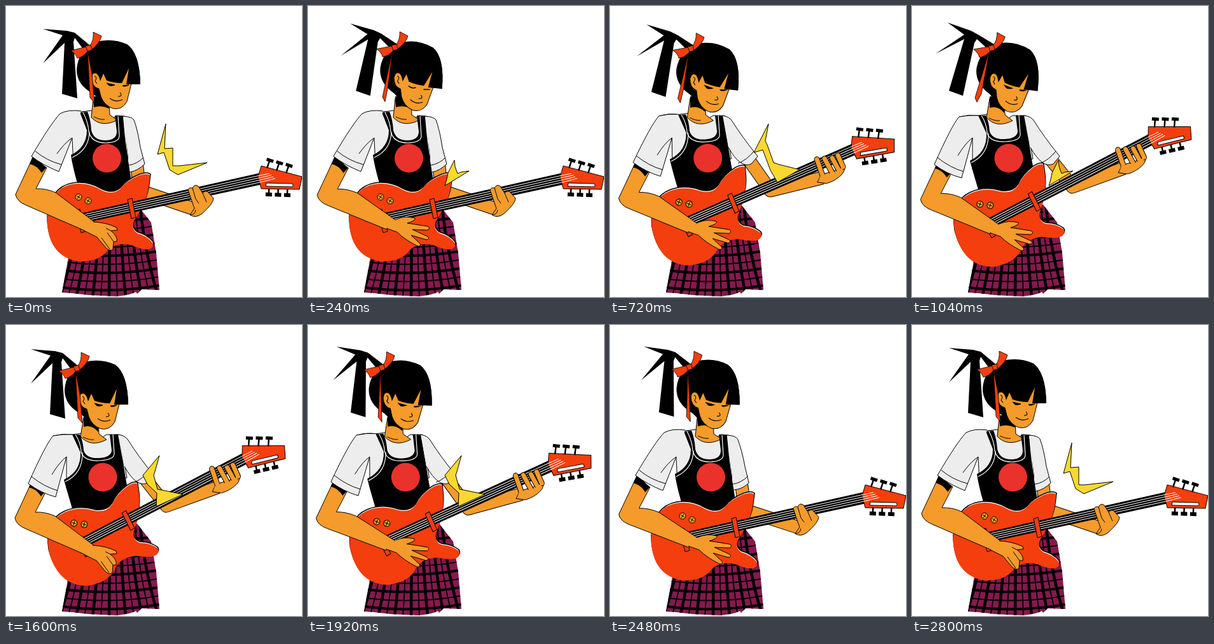
Write an HTML page with a canvas that moves like this. It is 465x457 px and loops after 2.88 s.

```html
<!DOCTYPE html>
<html>
<head>
<meta charset="utf-8">
<style>
  html, body { margin: 0; width: 100%; height: 100%; overflow: hidden; background: #fff; }
  canvas { display: block; }
</style>
</head>
<body>
<canvas id="stage" width="465" height="457"></canvas>
<script>
const ctx = document.getElementById('stage').getContext('2d');
const SKIN = '#f49b2b', RED = '#f43e0d', SHIRT = '#ededed', YELLOW = '#f9d92f', PLUM = '#85194f';
const STEP = 80, LOOP = 2800, CYCLE = 2880;
const NUM = /-?\d+(\.\d+)?/g;

const lerp = (a, b, k) => a + (b - a) * k;

// Blend two paths that share the same commands
function mix(a, b, k) {
  const target = b.match(NUM);
  let i = 0;
  return a.replace(NUM, n => lerp(+n, +target[i++], k));
}

function shape(d, fill, stroke, width = 1) {
  const path = new Path2D(d);
  if (fill) { ctx.fillStyle = fill; ctx.fill(path); }
  if (stroke) { ctx.strokeStyle = stroke; ctx.lineWidth = width; ctx.stroke(path); }
}

const line = (d, color = '#000', width = 1) => shape(d, null, color, width);

// Skin-coloured stroke with a thin outline
function limb(d, width) {
  line(d, '#000', width + 2);
  line(d, SKIN, width);
}

function disc(x, y, r, fill, stroke) {
  ctx.beginPath();
  ctx.arc(x, y, r, 0, 7);
  ctx.fillStyle = fill;
  ctx.fill();
  if (stroke) { ctx.strokeStyle = stroke; ctx.lineWidth = 1; ctx.stroke(); }
}

function placed(x, y, degrees, draw) {
  ctx.save();
  ctx.translate(x, y);
  ctx.rotate(degrees * Math.PI / 180);
  draw();
  ctx.restore();
}

// Eased value through [time, value] keys
function track(t, keys) {
  let i = 1;
  while (i < keys.length - 1 && keys[i][0] < t) i++;
  const [t0, a] = keys[i - 1], [t1, b] = keys[i];
  const p = Math.min(1, Math.max(0, (t - t0) / (t1 - t0)));
  return lerp(a, b, p * p * (3 - 2 * p));
}

const LIFT = [[0, 0], [480, 0], [840, 1], [1760, 1], [2320, 0], [LOOP, 0]];
const SLIDE = [[0, 0], [440, 0], [780, 1], [1840, 1], [2560, 0], [LOOP, 0]];
const STRUM = [[0, 0], [80, 1], [240, .1], [400, 1], [560, 0], [720, .1], [880, 1], [1040, .1], [1320, 1],
  [1520, .1], [1600, 0], [1700, 1], [1840, .1], [2160, 1], [2320, 1], [2520, .1], [2640, 0], [LOOP, 0]];
const BOW_X = [[0, 130], [240, 136], [720, 127], [1040, 125], [1600, 111], [2160, 119], [LOOP, 130]];
const BOW_Y = [[0, 66], [240, 65], [720, 67], [1040, 66], [1600, 68], [2160, 66], [LOOP, 66]];
const NOD = [[0, 0], [240, .75], [520, .2], [720, .8], [1040, 1], [1280, .3], [1600, 0], [2160, .45], [LOOP, 0]];

const BOLTS = [
  'M230 242L220 262L218 272L215 282L222 278L253 259L240 261L235 263L233 258L231 252Z',
  'M241 205L215 236L222 250L237 264L236 285L278 266L244 259L238 258L232 236L234 230Z',
  'M249 185L226 230L240 226L252 258L263 277L298 257L266 249L257 246L247 218L244 212Z',
  'M251 185L238 233L248 230L257 257L270 265L316 246L272 251L262 251L262 223L249 224Z'
];
const STRIKES = [160, 480, 960, 1440, 1760, 2480];

function drawSkirt() {
  const d = 'M108 340L98 395L88 450L104 451L130 454L150 455L173 456Q196 454 204 449L206 452L213 445L241 446L236 388L228 340L206 312Z';
  shape(d, PLUM);
  ctx.save();
  ctx.clip(new Path2D(d));
  for (let i = 0; i < 13; i++) {
    const x = 84 + i * 13;
    line(`M${lerp(165, x, .6)} 310Q${lerp(165, x, .72)} 395 ${x} 458`, '#000', i % 2 ? 1.8 : 4.5);
  }
  for (let i = 0; i < 9; i++) {
    const y = 336 + i * 13.5;
    line(`M80 ${y - 3}Q165 ${y + 9} 245 ${y - 6}`, '#000', i % 2 ? 2 : 4);
  }
  ctx.restore();
}

function drawTorso(g) {
  shape(mix('M85 170Q100 162 118 166L136 164Q150 190 174 172L186 173L192 240L106 250L104 208Z',
    'M74 174Q90 170 104 172L119 170Q134 190 158 172L178 172L190 240L95 256L95 207Z', g), SHIRT, '#000');
  shape(mix('M137 145L134 175Q150 192 175 179L163 171L162 145Z',
    'M122 145L117 175Q133 193 158 180L146 171L145 145Z', g), SKIN, '#000');
  shape(mix('M137 142L138 159Q150 155 162 161L160 142Z',
    'M122 142L122 160Q135 156 145 168L145 142Z', g), '#000');
  line(mix('M138 174Q148 179 155 178', 'M121 176Q131 181 138 180', g));
  shape(mix('M116 167L128 166Q133 178 134 195Q138 212 158 211Q174 210 174 197L171 172L184 173Q186 200 188 215Q192 245 197 275L206 325L115 325L112 278Q104 250 102 234Q127 222 127 195Z',
    'M104 172L116 172Q121 182 122 197Q126 210 146 209Q165 208 166 197L163 172L176 172Q181 200 184 215Q188 245 196 280L206 325L115 325L104 288Q95 258 91 243Q118 230 117 200Z', g), '#000');
  line(mix('M121 167Q129 182 130 197Q134 215 157 215Q178 214 178 204L176 173', 'M109 172Q117 184 118 199Q122 214 146 213Q170 212 170 202L168 172', g), '#fff', 1.2);
  line(mix('M131 198Q130 226 104 238', 'M120 200Q121 233 93 246', g), '#fff', 1.2);
  disc(lerp(158.5, 152, g), 239, 22.5, '#ea322c');
}

function drawFretArm(g, k, hand) {
  const reach = Math.min(1, k * 1.5);
  const elbow = [lerp(210, 252, reach), lerp(290, 284, reach) + (1 - g) * reach * 22];
  ctx.lineJoin = 'round';
  limb(`M${lerp(204, 214, reach)} 236L${elbow}L${hand.x - 10} ${hand.y + 13}`, 19);
  ctx.lineJoin = 'miter';
  shape(mix('M184 173Q198 174 201 179Q207 195 211 222L218 248Q208 258 195 261L187 215Z',
    'M177 172Q188 174 192 181L207 205L232 236Q222 248 205 256L186 222Z', reach), SHIRT, '#000');
  line(mix('M216 238Q206 248 193 250', 'M226 228Q215 242 201 247', reach));
}

function drawGuitar() {
  const body = 'M227 264Q222 260 210 264Q190 272 180 285Q168 296 150 287Q128 274 104 278Q70 284 65 330Q65 390 113 399Q146 401 160 382Q172 369 196 373Q216 382 226 380Q234 376 231 370Q222 359 207 355Q196 348 202 335Q222 305 225 280Z';
  shape(body, '#fff', '#000', 1.6);
  placed(-.5, 2, 0, () => shape(body, RED));
  disc(114, 300, 5, '#e8a72c', '#000');
  disc(129, 306, 5, '#e8a72c', '#000');
  line('M111 298L117 302M116 297L112 303M126 304L132 308M131 303L127 309');
  shape('M120 325L400 262L403 280L122 341Z', '#000');
  shape('M109 321L116 319L125 354L118 356Z', RED, '#000');
  shape('M401 251L465 268L461 288L401 287L396 268Z', RED, '#000');
  for (let i = 0; i < 4; i++)
    line(`M121 ${328 + i * 3.3}L${399 + i} ${266 + i * 3.4}L${414 + i * 3} ${263 + i * 2.6}`, '#fff');
  shape('M191 304L198 302L204 332L197 334Z', RED, '#000');
  shape('M409 278L450 279Q452 282 450 284L408 283Z', '#fff', '#000');
  for (let i = 0; i < 3; i++) {
    placed(413 + i * 15, 246 + i * 4, 19, () => { line('M-5 -4H6', '#000', 5); line('M0 -4V9', '#000', 2.5); });
    placed(413 + i * 14.5, 291 + i * .5, 2, () => { line('M-5 5H5', '#000', 6); line('M0 -4V6', '#000', 2.5); });
  }
}

function drawFretHand(k, hand) {
  placed(hand.x, hand.y, 0, () => {
    if (k < .4) {
      shape('M-20 -17Q-18 -22 -13 -20Q-10 -27 -4 -23L3 -12Q8 -18 12 -13L20 -4Q20 4 2 20Q-8 28 -17 22L-10 12Z', SKIN, '#000');
      line('M-13 -20L-8 -3L-3 4M3 -12L9 2M-17 22Q-9 22 -8 14');
      return;
    }
    ctx.lineCap = ctx.lineJoin = 'round';
    shape('M-12 8L8 2L23 -6Q27 0 20 8Q10 18 -4 22L-18 20Z', SKIN, '#000');
    for (const finger of ['M-19 -16L-10 10', 'M-7 -17L6 7', 'M5 -18L16 2', 'M14 -22L22 -4']) limb(finger, 7);
    shape('M-13 9L8 5L22 -4L20 6Q10 16 -4 20L-17 19Z', SKIN);
  });
}

function drawStrumArm(g, u) {
  ctx.save();
  ctx.translate(-g, 7 * g);
  shape(mix('M42 238L15 296Q17 307 32 313L124 353L140 340L78 293Q62 286 47 287L64 254Z',
    'M38 244L9 303Q12 314 28 317L122 334L131 313L72 299Q56 293 40 291L58 258Z', u), SKIN, '#000');
  shape(mix('M43 234L37 248Q48 250 56 262L63 254Z', 'M41 238L35 249Q45 251 53 264L60 258Z', u), '#000');
  if (u > .6) {
    placed(0, (1 - u) * 20, 0, () => {
      const d = 'M130 312Q138 302 157 292Q163 294 150 304L180 303Q184 306 180 309L158 312L176 313Q178 318 160 320L165 323Q162 330 146 331L121 333';
      shape(d, SKIN);
      line(d + 'M158 312L146 314M160 320L148 320M150 304L140 309');
    });
  } else if (u > .04) {
    placed(2, -3 - u * 20, 0, () => {
      const d = 'M137 340Q150 334 166 338Q168 342 154 346L186 351Q191 354 186 357L162 356L186 367Q190 371 184 372L160 365L174 378Q176 383 170 382Q150 372 138 360L121 354';
      shape(d, SKIN);
      line(d);
    });
  } else {
    const d = 'M137 339Q158 340 174 348L175 352L165 353Q176 362 174 370L169 370L168 382Q164 386 157 380L143 363L123 353';
    shape(d, SKIN);
    line(d + 'M165 353L157 349M169 370L159 356M163 382L150 364');
  }
  ctx.restore();
  shape(mix('M118 165Q98 162 85 169Q70 185 40 236Q58 250 83 260L104 207',
    'M104 172Q90 171 74 174Q62 188 35 249Q55 264 78 270L95 207', g), SHIRT);
  line(mix('M118 165Q98 162 85 169Q70 185 40 236Q58 250 83 260L104 207Q92 215 80 232M46 228Q64 243 87 249',
    'M104 172Q90 171 74 174Q62 188 35 249Q55 264 78 270L95 207Q84 215 72 235M40 238Q60 254 81 260', g));
}

function drawTail(s) {
  shape(mix('M2 -4L-22 -24L-34 -27L-72 -30L-41 -20L-72 24L-38 -8L-42 72L-18 79L-24 -10L-22 -16L-4 8Z',
    'M7 -4L-21 -21L-32 -27L-69 -40L-43 -21L-88 9L-43 -14L-67 67L-45 75L-27 -8L-23 -14L1 8Z', s), '#000');
}

// Head coordinates are relative to the bow
function drawHead(s, blink) {
  placed(0, 0, 8 * s, () => placed(-130, -66, 0, () => {
    shape('M137 138Q111 124 111 100Q113 70 140 57Q165 49 190 60Q210 74 211 122L190 123L150 150Z', '#000');
    shape('M146 100L146 108Q136 100 134 113Q135 127 146 130L149 142Q154 156 168 161Q182 164 190 150L197 122L195 96Z', SKIN, '#000');
    shape('M140 104Q146 108 148 118L153 106L158 117Q170 121 182 121L193 98L189 123L211 123Q210 74 190 60L150 60Z', '#000');
    line('M139 110Q144 112 140 118L143 122M179 136Q184 142 176 142M163 145Q173 152 183 147', '#000', 1.1);
    if (blink) line('M158 124Q164 128 170 125M182 127L192 126', '#000', 1.5);
    else {
      shape('M158 121L171 124Q166 126 162 125Z', '#000', '#000');
      shape('M183 125L193 124Q187 127 184 126Z', '#000', '#000');
    }
  }));
  shape(mix('M-2 3L2 78L9 86L5 40Z', 'M-3 3L-26 78L-23 85L-16 72Z', s), RED, '#000', .8);
  placed(0, 0, 4 * s, () => {
    shape('M2 -4Q8 -12 7 -25L20 -19Q18 -8 4 3Z', RED, '#000', .8);
    shape('M-4 -2L-28 4Q-20 9 -18 16Q-8 14 -1 4Z', RED, '#000', .8);
    shape('M-5 -3L3 -5L5 3L-2 5Z', RED, '#000', .8);
  });
}

function draw(t) {
  const g = track(t, LIFT), k = track(t, SLIDE), s = track(t, NOD);
  const turn = -15 * g, a = turn * Math.PI / 180;
  // The fretting hand slides along the turning neck
  const along = 153 + 53.6 * k, across = -27 - 12 * k;
  const hand = {
    x: 153 + along * Math.cos(a) - across * Math.sin(a),
    y: 333 + along * Math.sin(a) + across * Math.cos(a)
  };
  const bowX = track(t, BOW_X), bowY = track(t, BOW_Y);

  ctx.fillStyle = '#fff';
  ctx.fillRect(0, 0, 465, 457);
  placed(bowX, bowY, 0, () => drawTail(s));
  drawSkirt();
  drawTorso(g);
  placed(bowX, bowY, 0, () => drawHead(s, t >= 160 && t <= 320));
  drawFretArm(g, k, hand);
  placed(153, 333, turn, () => placed(-153, -333, 0, drawGuitar));
  drawFretHand(k, hand);
  drawStrumArm(g, track(t, STRUM));
  for (const start of STRIKES) {
    const bolt = BOLTS[(t - start + LOOP) % LOOP / STEP - 1];
    if (bolt) shape(bolt, YELLOW, '#000');
  }
}

function tick() {
  const t = Math.floor(performance.now() % CYCLE / STEP) * STEP;
  draw(t % LOOP);
  requestAnimationFrame(tick);
}
tick();
</script>
</body>
</html>
```
